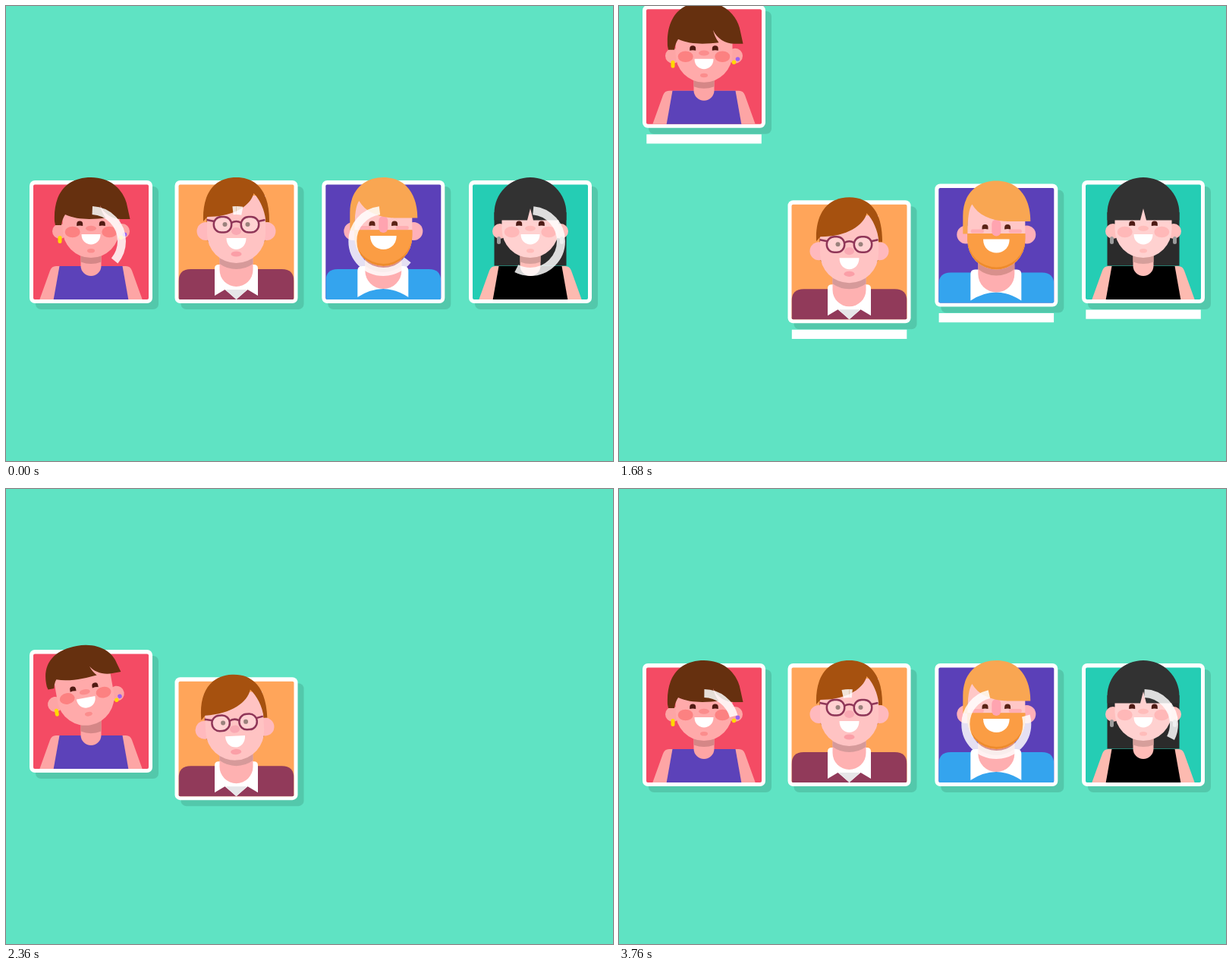
Animation of 800x600 px, one loop 3.8 s. Source, as an HTML page:

```html
<!DOCTYPE html>
<html lang="en">
<head>
<meta charset="utf-8">
<title>Team cards</title>
<style>
html, body { margin: 0; width: 100%; height: 100%; overflow: hidden; background: #5fe3c3; }
svg { display: block; width: 800px; height: 600px; }
</style>
</head>
<body>
<svg id="stage" viewBox="0 0 800 600">
  <defs><clipPath id="inner"><rect x="-76" y="235.5" width="152" height="151.5" rx="2"/></clipPath></defs>
</svg>
<script>
const LOOP = 3800;

// Shape helpers; x = 0 is the middle of a card
const path = (d, fill) => `<path d="${d}" fill="${fill}"/>`;
const oval = (x, y, rx, ry, fill) => `<ellipse cx="${x}" cy="${y}" rx="${rx}" ry="${ry}" fill="${fill}"/>`;
const box = (x, y, w, h, r, fill) => `<rect x="${x}" y="${y}" width="${w}" height="${h}" rx="${r}" fill="${fill}"/>`;
const pair = (f, dx) => f(-dx) + f(dx);
const ears = (dx, r, fill) => pair(x => oval(x, 297, r, r, fill), dx);
const eyes = fill => pair(x => path(`M${x - 4} 290V287.5a4 4 0 0 1 8 0V290Q${x} 289 ${x - 4} 290Z`, fill), 14.8);
const face = (w, chin, fill) => path(`M${-w} 250H${w}V${chin - w}A${w} ${w} 0 0 1 ${-w} ${chin - w}Z`, fill);
const smile = (w, top, h) =>
  path(`M${-w} ${top}H${w}C${w} ${top + h * 1.33} ${-w} ${top + h * 1.33} ${-w} ${top}Z`, '#fff');
// The shade is the chin's own curve, 8 px lower
function neck(w, end, chin, skin, shade) {
  const side = chin - 30 + Math.sqrt(38 * 38 - w * w);
  return path(`M${-w} 315H${w}V${end - w}A${w} ${w} 0 0 1 ${-w} ${end - w}Z`, skin) +
    path(`M${-w} 315H${w}V${side}A38 38 0 0 1 ${-w} ${side}Z`, shade);
}
const shoulders = fill => path('M-76 390V363Q-76 347 -60 347H60Q76 347 76 363V390Z', fill);
const tankTop = (fill, skin) =>
  path('M-68 388L-54 349Q-52 343 -46 343H46Q52 343 54 349L68 388Z', skin) +
  path('M-41.5 343H41.5L49.5 388H-49.5Z', fill);
const softFace = (blush, lip, eye) =>
  pair(x => oval(x, 298, 10, 7.3, blush), 24.3) + oval(0, 293.3, 7, 3.5, lip) +
  eyes(eye) + smile(12.5, 301, 13.5) + oval(0, 322.8, 5, 2.8, lip);

// nod: face shift per degree of tilt; sweep: how far the fringe follows the face
const people = [
  {
    x: 112, bg: '#f44b64', back: '', tilt: [2020, 0, 2360, -10, 2700, 6, 3080, -3.5, 3400, 0], nod: .7, sweep: 1.6,
    body: tankTop('#5c42b9', '#fda5a5') + neck(13.5, 356, 332, '#fda5a5', '#d58787'),
    head: ears(41, 10, '#fda5a5') + box(-43.5, 303, 5, 10, 2.5, '#ffd900') +
      oval(39.5, 305.5, 2.7, 2.7, '#ffd900') + oval(44.5, 301.3, 2.8, 2.8, '#9a62f0') + face(37.5, 332, '#ffaaaa'),
    features: softFace('#fc8181', '#fb8d8d', '#501a12'),
    hair: path('M-48 284C-50 246 -31 226 0 226C29 226 45 246 48 265L51.5 281H40C28 281 17 274 12 263' +
      'Q14 272 19.5 279.5C5 281 -17 283 -34 275Q-38 281 -39 289H-47Z', '#66300f'),
    zeros: [3083, 3793]
  },
  {
    x: 303.5, bg: '#ffa55a', back: box(-39, 270, 78, 46, 12, '#a6510f'),
    tilt: [2250, 0, 2360, -3, 2580, -9, 2830, 6, 3080, -2, 3300, 0], nod: -.4, sweep: 0,
    body: shoulders('#913a5a') +
      path('M-28.5 346Q-28.5 341 -23 341H23Q28.5 341 28.5 346V382L15 374L0 387L-15 374L-28.5 382Z', '#fff') +
      path('M-14 374H14L0 387Z', '#e6e6e8') + neck(22, 370, 339, '#feb1b1', '#d69a9a'),
    head: ears(40, 12, '#ffb9bd') + face(38.5, 339, '#ffc3c3') +
      path('M-43.5 284C-45 246 -28 226 0 226C28 226 44 246 43.5 285H39C38 270 31 255 23 247' +
        'C19 263 -3 278 -38 278Z', '#a6510f'),
    features: oval(0, 297, 6.5, 5, '#f9a9b3') + pair(x => oval(x, 288, 3, 3, '#795850'), 15) +
      `<g fill="#fff" fill-opacity=".25" stroke="#8f3658" stroke-width="2.5">` +
      pair(x => `<rect x="${x - 11.7}" y="278" width="23.4" height="20.5" rx="10"/>`, 18) +
      `<path fill="none" d="M-6.5 286Q0 282 6.5 286M-29 284L-39 282M29 284L38 282"/></g>` +
      smile(13, 306, 15) + oval(0, 327, 7, 3.6, '#fb9fa7'),
    hair: '', zeros: [3270, 3980]
  },
  {
    x: 497.3, bg: '#5b40b8', back: '',
    tilt: [2470, 0, 2820, -9, 3080, 6.5, 3330, -2, 3500, 0], nod: .7, sweep: 0,
    body: shoulders('#34a4ee') +
      path('M-34 349Q-34 343 -28 343H27Q33 343 33 349V384Q0 362 -34 384Z', '#fff') +
      neck(24, 373, 343, '#feaeb0', '#d8908c'),
    head: ears(40, 12, '#ffb0b8') + face(38, 343, '#ffc7c7') +
      path('M-38 295.5H38V305A38 38 0 0 1 -38 305Z', '#ee8b2c') +
      path('M-38 295.5H38V302A38 38 0 0 1 -38 302Z', '#fb9d44'),
    features: pair(x => box(x - 8.5, 290, 17, 5, 2, '#ffaeb3'), 25) + box(-6, 277, 12, 22, 6, '#ffa4b0') +
      eyes('#5a2316') + smile(17.3, 303, 18),
    hair: path('M-44 296V272C-44 244 -26 226 0 226C29 226 45 248 45 279.5H14C-7 279 -24 271 -32 257' +
      'Q-38 265 -38 296Z', '#f9a652'),
    zeros: [3534, 4244]
  },
  {
    x: 691, bg: '#25cdb4', back: box(-47.5, 272, 95, 70.5, 0, '#2b2b2b'),
    tilt: [2705, 0, 3080, -6, 3330, 5, 3560, -2, 3720, 0], nod: 1.4, sweep: 0,
    body: tankTop('#000', '#fdbab0') + neck(13.5, 356, 332, '#ffbdb8', '#d69f9b'),
    head: ears(40, 10, '#ffbfbd') + pair(x => box(x - 2.5, 304, 5, 10, 2.5, '#9b9b9b'), 41.5) +
      face(37.5, 332, '#ffd1d0'),
    features: softFace('#ffb8b8', '#ffbcba', '#4c1a14'),
    hair: path('M-47.5 282.5V273A47.5 47 0 0 1 47.5 273V282.5H4L0 267L-4 282.5Z', '#323232'),
    zeros: [3760, 4470]
  }
];

const ring = `<circle class="ring" r="40.5" pathLength="360" transform="translate(0 310) rotate(-90)"
  fill="none" stroke="#fff" stroke-opacity=".84" stroke-width="11"/>`;

document.getElementById('stage').insertAdjacentHTML('beforeend', people.map(p => `
  <g class="card">
    ${box(-73, 238, 162, 162, 7, 'rgba(0,0,0,.12)')}
    <rect class="bar" x="-75.7" y="400.5" height="12.2" fill="#fff"/>
    ${box(-81, 230, 162, 162, 7, '#fff')}${box(-76, 235.5, 152, 151.5, 2, p.bg)}
    <g class="tilt">${p.back}</g>
    <g clip-path="url(#inner)">${p.body}</g>
    <g class="tilt">${p.head}<g class="features">${p.features}</g><g class="hair">${p.hair}</g></g>
    ${ring}${ring}
  </g>`).join(''));

document.querySelectorAll('.card').forEach((el, i) => {
  const p = people[i];
  p.card = el;
  p.bar = el.querySelector('.bar');
  p.tilts = el.querySelectorAll('.tilt');
  p.feats = el.querySelector('.features');
  p.fringe = el.querySelector('.hair');
  p.rings = el.querySelectorAll('.ring');
});

const clamp = v => Math.min(1, Math.max(0, v));
const smooth = v => v * v * (3 - 2 * v);
const ramp = (t, a, b) => clamp((t - a) / (b - a));

// cubic-bezier(.8, 0, .2, 1)
function swift(x) {
  if (x <= 0 || x >= 1) return clamp(x);
  let lo = 0, hi = 1;
  for (let n = 0; n < 24; n++) {
    const s = (lo + hi) / 2, r = 1 - s;
    if (2.4 * s * r * r + .6 * s * s * r + s * s * s < x) lo = s; else hi = s;
  }
  return smooth(lo);
}

// Smooth steps through a flat [time, value, ...] list
function track(t, keys) {
  let v = keys[1];
  for (let k = 2; k < keys.length; k += 2)
    v += (keys[k + 1] - keys[k - 1]) * smooth(ramp(t, keys[k - 2], keys[k]));
  return v;
}

const leave = t => 26.5 * smooth(ramp(t, 1228, 1430)) - 456.5 * ramp(t, 1430, 1715) ** 4.5;
const enter = t => track(t, [1998, 450, 2158, -32, 2600, 0]);

function draw(t) {
  people.forEach((p, i) => {
    const gone = t - 200 * i >= 1715;
    const y = gone ? enter(t - 235 * i) : leave(t - 200 * i);
    p.card.setAttribute('transform', `translate(${p.x} ${y})`);
    p.bar.setAttribute('width', gone ? 0 : 151.5 * ramp(t - 227 * i, 480, 828) ** 2);

    const angle = track(t, p.tilt), nod = angle * p.nod;
    p.tilts.forEach(g => g.setAttribute('transform', `translate(0 ${nod * .4}) rotate(${angle} 0 335)`));
    p.feats.setAttribute('transform', `translate(0 ${nod * .8})`);
    p.fringe.setAttribute('transform',
      `translate(0 226) scale(1 ${1 + nod * p.sweep / 55}) translate(0 -226)`);

    p.rings.forEach((c, k) => {
      const u = (t - p.zeros[k] + LOOP * 1.5) % LOOP - LOOP / 2;
      const end = 360 * swift((u + 330) / 720), start = 360 * swift((u + 70) / 720);
      const len = end - start;
      c.setAttribute('visibility', len > .05 ? 'visible' : 'hidden');
      c.setAttribute('stroke-dasharray', `0 ${start} ${len} 720`);
    });
  });
}

const began = performance.now();
function tick() {
  draw((performance.now() - began) % LOOP);
  requestAnimationFrame(tick);
}
tick();
</script>
</body>
</html>
```
